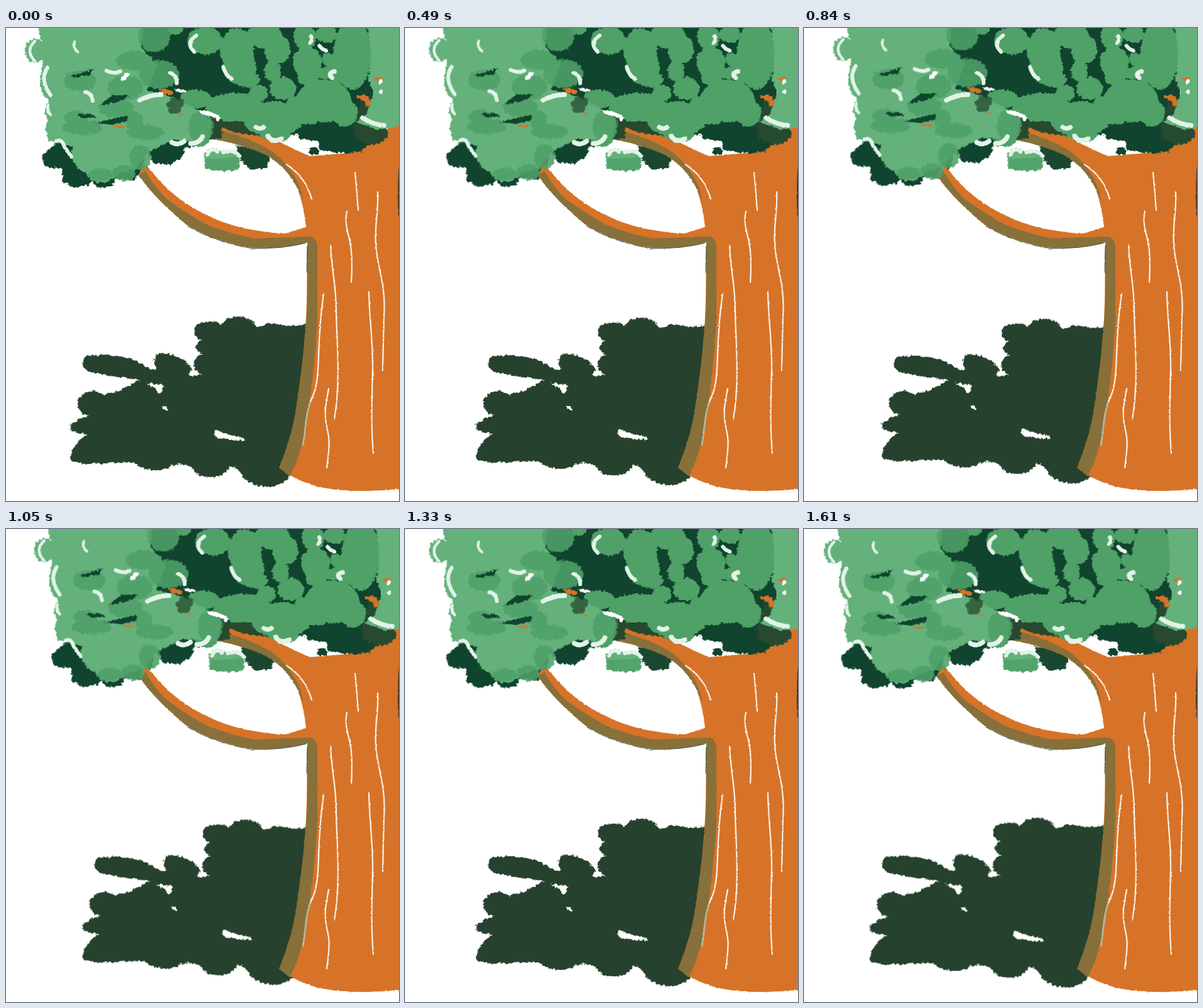
Animation, 626 px wide and 753 px high, one loop 1680 ms. Source, as an HTML page:

```html
<!DOCTYPE html>
<html lang="en">
<head>
<meta charset="utf-8">
<title>Swaying tree</title>
<style>
  html, body { margin: 0; width: 100%; height: 100%; overflow: hidden; background: #fff; }
  svg { display: block; width: 626px; height: 753px; }

  .sway, .shade { animation: sway 1680ms -1610ms infinite steps(12, end); }
  .shade { animation-name: shrink; transform-origin: 750px 568px; }
  .left  { --x: 18px; --y: -3px; }
  .mid   { --x: 15.4px; --y: 0px; }
  .right { --x: 16px; --y: 0px; }
  .low   { --x: 9px; --y: 0px; }

  @keyframes sway {
    0%, 100% { transform: translate(calc(var(--x) * -.09), calc(var(--y) * -.09)); }
    50% { transform: translate(var(--x), var(--y)); }
  }
  @keyframes shrink {
    0%, 100% { transform: scale(1.003); }
    50% { transform: scale(.963); }
  }

  .rough { filter: url(#rough); }
  .bark { filter: url(#bark); }
  .ground { fill: #26412d; }
  .dark { fill: #10442e; }
  .murk { fill: #27492f; }
  .midtone { fill: #4fa168; }
  .light { fill: #64b17b; }
  .wood { fill: #d67328; }
  .olive { fill: #87703a; }
  .gap { fill: #fff; }
  .shine path { fill: none; stroke: #e2f3e7; stroke-width: 6; stroke-linecap: round; }
  .shine .thin { stroke-width: 4.5; }
  .shine .bold { stroke-width: 7.5; }
  .grain { fill: none; stroke: #fbf3ea; stroke-width: 2.2; stroke-linecap: round; }
</style>
</head>
<body>
<svg viewBox="0 0 626 753">
  <defs>
    <filter id="rough" filterUnits="userSpaceOnUse" x="-30" y="-30" width="720" height="820" color-interpolation-filters="sRGB">
      <feTurbulence type="fractalNoise" baseFrequency=".2" numOctaves="3" seed="4"/>
      <feDisplacementMap in="SourceGraphic" scale="7" xChannelSelector="R" yChannelSelector="G"/>
    </filter>
    <filter id="bark" filterUnits="userSpaceOnUse" x="-30" y="-30" width="720" height="820" color-interpolation-filters="sRGB">
      <feTurbulence type="fractalNoise" baseFrequency=".25" numOctaves="2" seed="9"/>
      <feDisplacementMap in="SourceGraphic" scale="2.5" xChannelSelector="R" yChannelSelector="G"/>
    </filter>
  </defs>

  <!-- shadow on the ground -->
  <g class="shade"><g class="rough">
    <path class="ground" d="M490 468L478 470Q455 478 425 470Q412 470 400 478C392 455 356 453 343 473C328 462 300 468 300 481Q300 493 312 497C300 500 300 514 313 520C296 522 294 546 311 552L291 554Q296 546 294 540C284 524 262 516 240 519C232 526 236 538 241 543L230 543C200 522 165 517 130 522C118 528 118 540 130 546Q170 556 214 560Q192 571 178 578L154 583C136 572 113 582 114 600Q114 614 131 618C113 622 100 630 102 637Q108 646 129 647C113 655 97 680 105 690C120 699 180 689 205 692C215 706 252 708 264 696Q284 692 297 700C302 718 346 722 357 698Q368 698 373 708C390 736 437 738 450 714L500 600Z"/>
    <path class="gap" d="M222 565L250 569 246 582 234 572ZM247 602q6-4 11 5q-6 3-11-5ZM331 639Q352 648 380 652L379 656Q350 656 334 651Z"/>
  </g></g>

  <!-- leaves behind the branches -->
  <g class="sway mid"><g class="rough dark">
    <path d="M95-20H585V150L470 168 445 172 400 172 345 165 322 134 300 130 240 150 180 150Z"/>
  </g></g>
  <g class="sway left"><g class="rough dark">
    <path d="M85 178L58 203 61 221 89 224 90 245 108 254 130 250 138 243 145 254 168 253 174 240 205 242 217 225 224 195 235 215 262 217 280 208 285 190 310 188 330 160 240 150Z"/>
  </g></g>
  <g class="sway low"><g class="rough murk">
    <path d="M366 186L424 200 415 222 390 226 372 208Z" fill="#1a4730"/>
  </g></g>

  <!-- trunk and branches -->
  <g class="bark">
    <path class="wood" d="M338 147Q375 150 400 162Q440 185 484 204L545 199 565 180 630 150V733Q560 742 500 731Q455 718 435 700Q456 650 463 600Q478 500 479 430L480 341Q440 352 390 350Q335 340 290 315Q240 275 211 234L222 215Q236 235 258 257Q310 303 380 319Q430 328 445 327L478 317Q474 280 463 252Q440 210 390 190L335 176Z"/>
    <path class="olive" d="M211 234L222 228Q240 258 257 273Q290 297 320 313Q355 327 395 335L485 332Q497 334 496 355V470Q490 560 479 625Q470 680 452 714L435 700Q456 650 463 600Q478 500 480 430L480 341Q440 352 390 350Q335 340 290 315Q240 275 211 234Z"/>
    <path class="olive" d="M330 160Q385 172 425 197Q464 227 474 275L470 268Q452 224 418 204Q380 186 335 178Z"/>
    <path fill="none" stroke="#2d4a2c" d="M290 316Q335 341 390 351Q440 352 479 342M480 345L479 390"/>
    <path fill="none" stroke="#3b2a18" stroke-width="2" d="M627 218Q624 255 626 300"/>
    <g class="grain">
      <path d="M446 217Q476 235 487 272"/>
      <path d="M556 230Q559 260 561 290"/>
      <path d="M543 292Q539 308 546 332T550 405"/>
      <path d="M592 261C594 290 587 310 589 345S606 410 602 460L600 545"/>
      <path d="M517 346C519 390 526 410 526 450S534 560 523 622"/>
      <path d="M506 423C502 450 499 490 498 520S496 572 487 590S477 640 473 664"/>
      <path d="M578 420C579 470 585 500 584 545S581 630 585 676"/>
      <path d="M514 574C509 600 507 612 510 630S518 650 511 700"/>
      <path d="M484 596Q478 620 473 664" stroke="#a3b79c"/>
    </g>
  </g>

  <!-- leaves in front -->
  <g class="sway right"><g class="rough">
    <path class="dark" d="M466 140H600V160L566 196 545 200 500 195 498 180 466 176ZM484 190h13v12h-13Z"/>
    <path class="murk" d="M553 150L605 156 608 172 596 184 575 186 556 176Z"/>
  </g></g>
  <g class="sway mid"><g class="rough">
    <path class="murk" d="M316 140Q350 142 380 152L422 166 416 174 366 166 344 158 343 176 322 178Z"/>
    <g class="midtone" id="midLeaves"></g>
  </g></g>
  <g class="sway left"><g class="rough">
    <path class="light" d="M50-20L50 0 59 28 58 60Q51 90 66 112L65 140 68 180 106 188 114 225 150 241 205 225 230 195 266 178 320 180 330 150 300 128 260 108 225 100 240 60 215 30 222-20Z"/>
    <g class="light" id="leftEdge"></g>
    <g class="midtone" id="leftLeaves" opacity=".88"></g>
    <path class="dark" d="M104 76l20-6 16-5-6 10-26 4ZM148 124l22-18 26 2-12 8-20 4ZM112 137l26 0 6 5-24 2ZM142 151l50-11 2 8-26 6Z"/>
    <path class="murk" d="M254 122Q266 104 284 114L276 136 262 136Z" opacity=".75"/>
    <path class="wood" d="M243 97l20 2 2 6-16 0ZM170 156l19-1-1 4-16 0ZM274 135l9 3-3 2Z"/>
    <path class="gap" d="M182 80l6-7 9-1-4 8-8 5ZM268 97l20 2-4 4-12-2Z"/>
  </g></g>
  <g class="sway mid"><g class="rough">
    <path class="gap" d="M306 131Q330 132 342 142L339 148Q324 138 308 135Z"/>
  </g></g>
  <g class="sway right"><g class="rough">
    <g class="midtone" id="rightLeaves"></g>
    <path class="light" d="M570-20Q588 40 576 82L586 100 578 128 558 150 592 162 618 158 650 150V-20Z"/>
    <path class="murk" d="M557 146L566 116 579 118 574 138Z"/>
    <path class="wood" d="M559 108Q580 102 581 122L574 126Q574 114 559 113ZM585 79l15-1-2 9-8-4Z"/>
    <path class="gap" d="M594 84l6-2-1 7-5 1ZM596 98l5 1-3 6-4-3Z"/>
  </g></g>
  <g class="sway low"><g class="rough">
    <path class="light" d="M315 200Q328 190 344 196Q368 192 373 205L371 224Q345 231 318 224Z"/>
    <path class="midtone" d="M318 208L372 206 371 224Q345 231 318 224Z" opacity=".8"/>
  </g></g>

  <!-- highlights -->
  <g class="sway left"><g class="bark shine">
    <path class="thin" d="M46 21Q30 36 46 53"/>
    <path d="M66 63Q53 82 71 107"/>
    <path class="thin" d="M67 123q-3 9 4 15"/>
    <path class="thin" d="M109 22q-3 9 5 16"/>
    <path d="M160 68q11 6 22 1M126 102q11 2 12 14M80 180q9-4 13 9l11 16"/>
  </g></g>
  <g class="sway mid"><g class="bark shine">
    <path class="bold" d="M213 115q17-9 34-9"/>
    <path d="M261 71q12 5 11 17M303 12q-18 12-3 26M346 62q3 12 13 19"/>
    <path class="bold" d="M398 158q6 4 12 0M417 172q7 12 22 4"/>
  </g></g>
  <g class="sway right"><g class="bark shine">
    <path d="M486 13q3 6-2 11M499 28q4 6 11 8"/>
    <path class="bold" d="M523 69q-11 3-4 10M568 143q14 10 34 12"/>
  </g></g>
  <g class="sway low" style="--x: 12px"><g class="bark shine">
    <path class="bold" d="M264 182q10 6 20-2M294 184q14 0 19-11"/>
  </g></g>
  <g class="sway low"><g class="bark shine">
    <path d="M321 202q4-14 16-5M346 198q17-6 26 6"/>
  </g></g>
</svg>
<script>
  const NS = 'http://www.w3.org/2000/svg';

  // Each leaf: centre x, centre y, radius x, radius y
  function leaves(id, list) {
    const group = document.getElementById(id);
    for (const [cx, cy, rx, ry] of list) {
      const leaf = document.createElementNS(NS, 'ellipse');
      Object.entries({ cx, cy, rx, ry }).forEach(([k, v]) => leaf.setAttribute(k, v));
      group.append(leaf);
    }
  }

  leaves('leftEdge', [
    [47, 36, 17, 19], [71, 86, 17, 28], [74, 132, 12, 13], [85, 160, 22, 22],
    [150, 200, 46, 34], [152, 230, 24, 16]
  ]);
  leaves('leftLeaves', [
    [236, 14, 26, 24], [204, 52, 28, 16], [244, 74, 32, 23], [190, 95, 28, 20],
    [118, 84, 26, 16], [176, 128, 28, 15], [112, 142, 20, 10], [122, 158, 32, 12],
    [214, 206, 17, 20], [188, 231, 18, 13], [150, 234, 20, 10], [222, 166, 30, 12],
    [310, 158, 20, 26], [204, 148, 14, 16]
  ]);
  leaves('midLeaves', [
    [317, 20, 28, 22], [368, 34, 27, 34], [372, 62, 27, 28], [386, 82, 18, 13],
    [302, 113, 26, 15], [364, 126, 46, 23], [402, 104, 16, 13], [425, 145, 48, 28],
    [412, 12, 28, 20], [432, 34, 21, 23], [424, 68, 13, 17], [441, 96, 21, 18],
    [430, 168, 24, 13], [270, 2, 12, 9], [306, 176, 18, 13]
  ]);
  leaves('rightLeaves', [
    [476, 14, 18, 22], [480, 54, 23, 24], [482, 78, 18, 14], [510, 10, 17, 14],
    [512, 50, 9, 11], [508, 72, 12, 10], [552, 42, 30, 56], [532, 62, 20, 26],
    [506, 116, 44, 34], [540, 136, 22, 20], [480, 132, 28, 22], [460, 122, 14, 14]
  ]);
</script>
</body>
</html>
```
